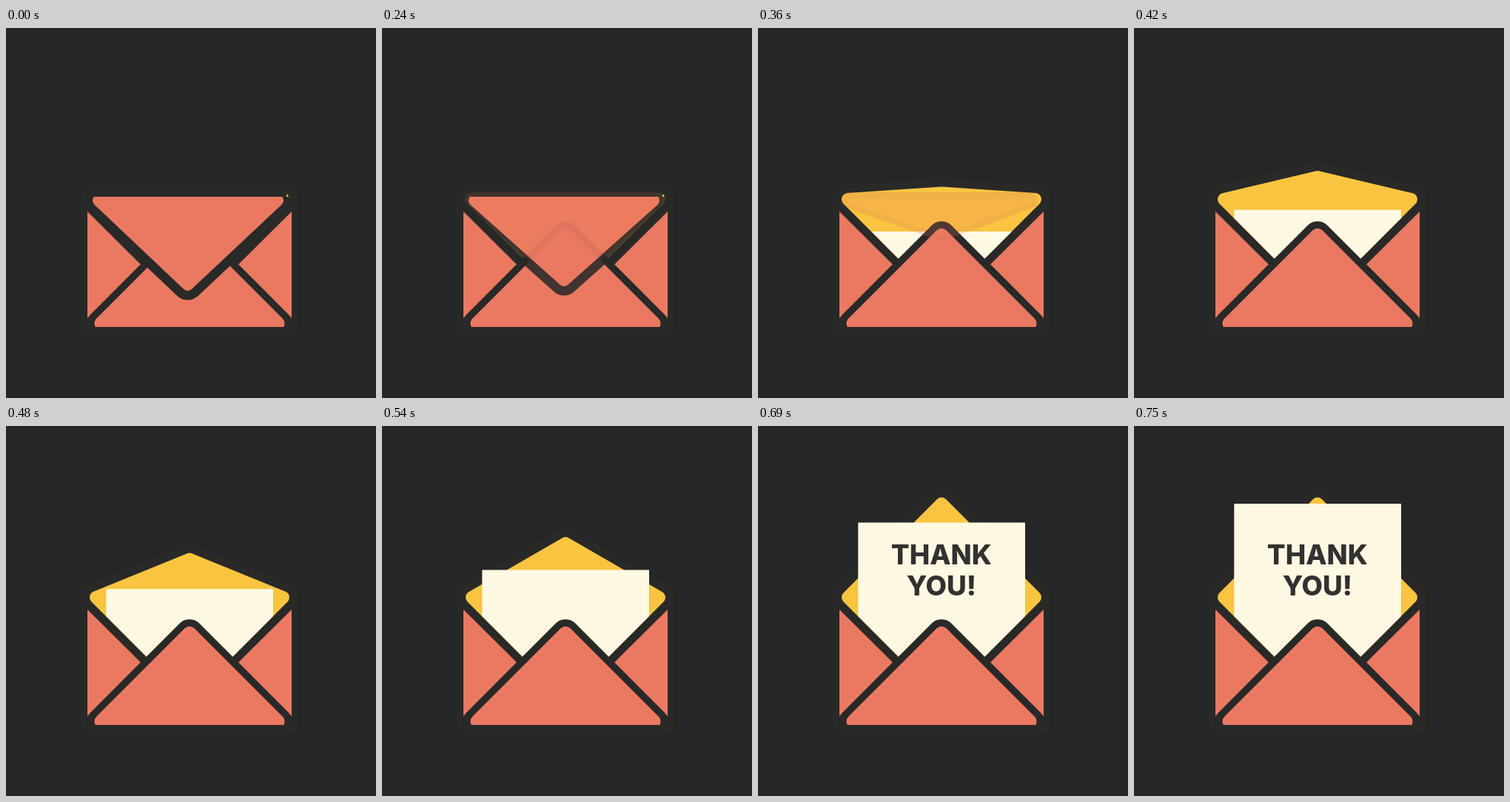
Recreate the animation shown at these times as an HTML page with a canvas. Size 500 by 500 pixels, loop 1560 ms.

```html
<!DOCTYPE html>
<html lang="en">
<head>
<meta charset="utf-8">
<title>Thank you letter</title>
<style>
  html, body { margin: 0; width: 100%; height: 100%; overflow: hidden; background: #252628; }
  canvas { display: block; width: 100vw; height: 100vh; }
</style>
</head>
<body>
<canvas id="stage" width="500" height="500"></canvas>
<script>
const ctx = document.getElementById('stage').getContext('2d');
const BG = '#252628', LINE = '#292928', RED = '#eb7961', YELLOW = '#f9c440', PAPER = '#fff9e3', INK = '#333031';
const LOOP = 1560, START = 240, STEP = 30, LAST = 18;
const CX = 248;

// Outline of a convex, clockwise polygon grown by r with round corners.
function hull(pts, r) {
  const n = pts.length;
  const normal = (p, q) => Math.atan2(p[0] - q[0], q[1] - p[1]);
  ctx.beginPath();
  pts.forEach((p, i) => {
    const prev = pts[(i + n - 1) % n], next = pts[(i + 1) % n];
    ctx.arc(p[0], p[1], r, normal(prev, p), normal(p, next));
  });
  ctx.closePath();
}

function poly(pts) {
  ctx.beginPath();
  pts.forEach(p => ctx.lineTo(p[0], p[1]));
  ctx.closePath();
}

function fill(color, alpha = 1) {
  ctx.globalAlpha = alpha;
  ctx.fillStyle = color;
  ctx.fill();
  ctx.globalAlpha = 1;
}

function clipped(trace, draw) {
  ctx.save();
  trace();
  ctx.clip();
  draw();
  ctx.restore();
}

function box(x, y, w, h) {
  ctx.beginPath();
  ctx.rect(x, y, w, h);
}

function drawBack(k) {
  const apex = Math.min(231.5, Math.max(105, 201.5 - 10.72 * (k - 7)));
  const pts = [[121.5, 231.5], [CX, apex], [374.5, 231.5], [CX, 358]];
  hull(pts, 20.5);
  fill(LINE);
  ctx.beginPath();
  ctx.roundRect(101, 213, 294, 203, 13);
  fill(LINE);
  hull(pts, 8.5);
  fill(YELLOW);
}

function drawPaper(k) {
  const top = k < 7 ? 246 + 14.5 * (7 - k) : 105 + 12.8 * (LAST - k);
  const pocket = () => poly([[135.3, 0], [361, 0], [361, 257], [CX, 370], [135.3, 257]]);
  clipped(pocket, () => {
    box(135, top, 227, 400 - top);
    fill(PAPER);
  });
  if (k >= 14) {
    ctx.fillStyle = INK;
    ctx.font = '800 36.8px Inter, sans-serif';
    ctx.textAlign = 'center';
    ctx.fillText('THANK', 247.8, 187);
    ctx.fillText('YOU!', 247.8, 229);
  }
}

function drawFront() {
  for (const side of [-1, 1]) {
    const edge = CX + side * 138;
    poly([[edge, 248], [CX + side * 66, 319.5], [edge, 392]]);
    fill(RED);
  }
  const pts = [[128.5, 399.2], [CX, 279.7], [367.5, 399.2]];
  clipped(() => box(101, 228, 294, 176), () => {
    hull(pts, 18.5);
    fill(LINE);
    hull(pts, 9);
    fill(RED);
  });
}

// The closed flap folds up while it fades away.
function drawFlap(k) {
  const body = [1, .95, .82, .65, .42, .2, .06][k];
  const line = [1, .87, .55, .2, .08, .02, 0][k];
  const late = Math.max(0, k - 1);
  const tip = k ? 341 - 16 * late : 347;
  const inner = Math.max(3, 8 - 2.5 * late);
  const outer = Math.max(11, 20.5 - 4.75 * late);
  const band = Math.max(3, 6 - 1.5 * late);
  const pts = [[125, 233], [367, 233], [245.5 + Math.min(k, 5) / 2, tip]];

  hull(pts, 11);
  fill(RED, body);
  clipped(() => box(0, 222 + band, 500, 278), () => {
    hull(pts, (inner + outer) / 2);
    ctx.globalAlpha = line;
    ctx.strokeStyle = LINE;
    ctx.lineWidth = outer - inner;
    ctx.stroke();
  });
  box(114, 222, 265, band);
  fill(LINE, Math.min(1, line * 1.5) * (k === 1 ? .87 : 1));
}

function draw(t) {
  const k = t < START ? 0 : Math.min(LAST, 1 + Math.floor((t - START) / STEP));
  box(0, 0, 500, 500);
  fill(BG);
  drawBack(k);
  drawPaper(k);
  drawFront();
  if (k < 7) drawFlap(k);
}

const begin = performance.now();
function tick() {
  draw((performance.now() - begin) % LOOP);
  requestAnimationFrame(tick);
}
tick();
</script>
</body>
</html>
```
